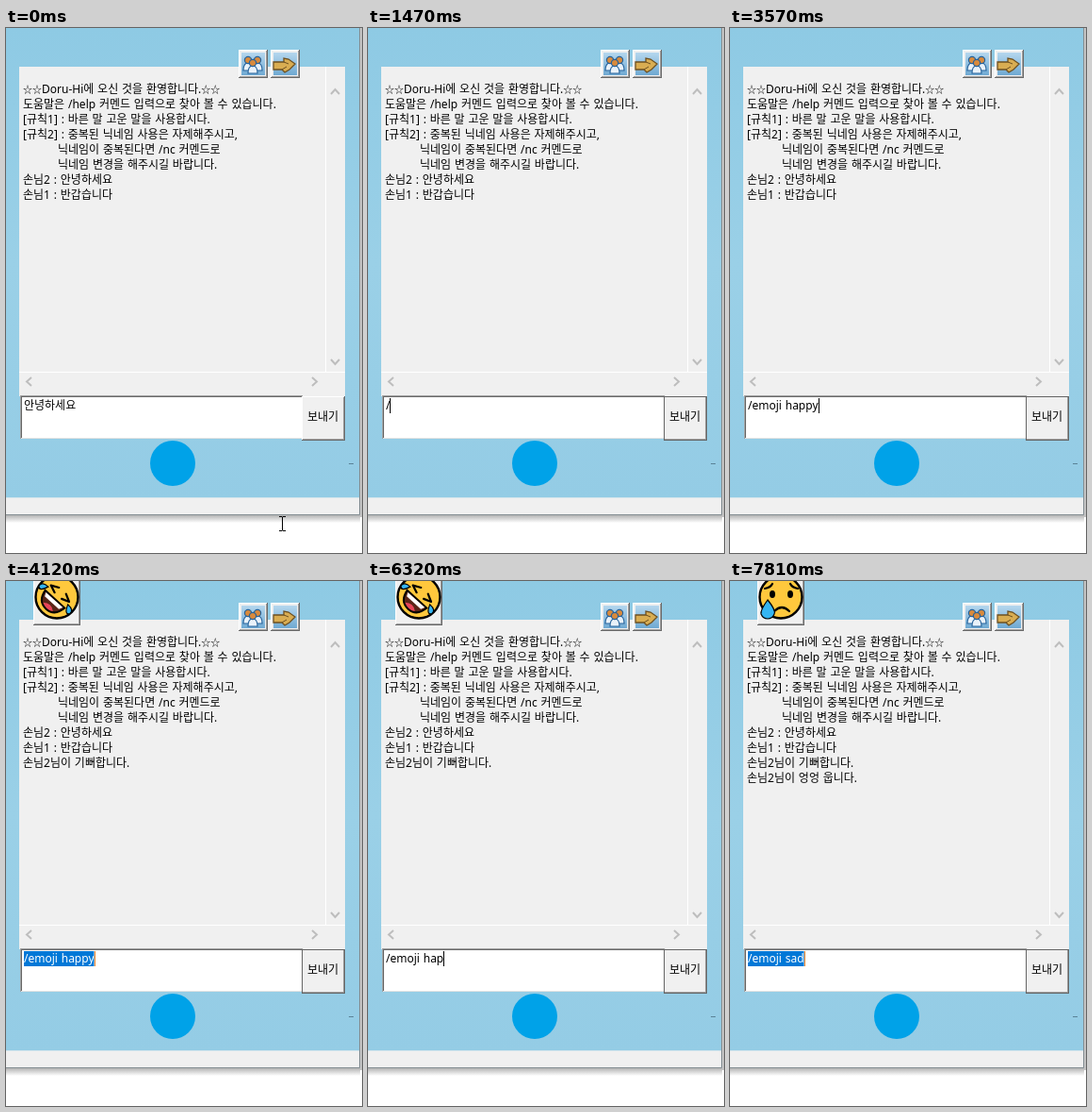
An HTML page that plays this animation: 378 by 556 pixels, repeating every 8000 ms.

```html
<!DOCTYPE html>
<html lang="ko">
<head>
<meta charset="utf-8">
<style>
html, body { margin: 0; width: 100%; height: 100%; overflow: hidden; background: #fff }
svg { display: block }
text {
  font: 12px "Noto Sans", "Noto Sans CJK KR", "Noto Sans CJK", sans-serif;
  word-spacing: .7px; white-space: pre;
}
.line { fill: none; stroke: #000; stroke-width: 2.2; stroke-linecap: round }
.arrow { fill: none; stroke: #bebebe; stroke-width: 2 }
.tear { fill: #35b5f2; stroke: #000; stroke-width: 1.2 }
.crisp { shape-rendering: crispEdges }
</style>
</head>
<body>
<svg width="378" height="556" viewBox="0 0 378 556">
  <defs>
    <linearGradient id="sky" x2="0" y2="1">
      <stop stop-color="#8ecae4"/><stop offset=".5" stop-color="#9ad0e7"/><stop offset="1" stop-color="#94cce5"/>
    </linearGradient>
    <linearGradient id="below" x2="0" y2="1">
      <stop stop-color="#aaa"/><stop offset="1" stop-color="#fff"/>
    </linearGradient>
    <linearGradient id="tile" x2="0" y2="1">
      <stop stop-color="#b5d7ee"/><stop offset="1" stop-color="#6fa9d2"/>
    </linearGradient>
    <g id="key" class="crisp">
      <path d="M0 0h31v30h-31z" fill="#696969"/>
      <path d="M0 0h30v29h-30z" fill="#fff"/>
      <path d="M1 1h29v28h-29z" fill="#a0a0a0"/>
      <path d="M1 1h28v27h-28z" fill="#f0f0f0"/>
      <path d="M3 3h25v24h-25z" fill="url(#tile)"/>
    </g>
    <g id="person" stroke="#27639b" stroke-width="1.2">
      <path d="M-5 11q0-8 5-8t5 8z" fill="#e9f2fa"/>
      <circle r="3.6" fill="#d98a3c"/>
    </g>
  </defs>

  <path d="M0 515h376v9h-376z" fill="url(#below)"/>
  <path d="M376 0h2v518h-2z" fill="#c4c4c4"/>
  <path d="M0 0h375v498h-375z" fill="url(#sky)"/>
  <path d="M0 498h375v17h-375z" fill="#f0f0f0"/>
  <path d="M0 497.5h375" stroke="#d5e5ec"/>
  <path d="M0 515.5h375.5V0" fill="none" stroke="#858f94"/>
  <path d="M364 461.5h5" stroke="#5b8296"/>
  <circle cx="177" cy="461" r="24" fill="#00a2e8"/>

  <g class="crisp">
    <path d="M14 41h346v349h-346z" fill="#f0f0f0"/>
    <path d="M339.5 41v323M14 364.5h346" stroke="#fff"/>
  </g>
  <path class="arrow" d="M345 70l4.500-5 4.500 5M345 351l4.500 5 4.500-5M27 370l-5 4.500 5 4.500M325 370l5 4.500-5 4.500"/>

  <use href="#key" x="247" y="23"/>
  <use href="#person" x="257" y="34"/>
  <use href="#person" x="267" y="34"/>
  <use href="#person" x="262" y="37"/>
  <use href="#key" x="281" y="23"/>
  <path d="M284 36h11v-4l5 1 7 5-6 6-5 3-3-3h-9z" fill="#d9ad52" stroke="#6d5021" stroke-width="1.3"/>
  <path d="M295 36l5 2M293 44l5-3" stroke="#6d5021"/>

  <g class="crisp">
    <path d="M15 389h300v46h-300z" fill="#fff"/>
    <path d="M15.500 435V389.500H315" fill="none" stroke="#a0a0a0"/>
    <path d="M16.500 434V390.500H314" fill="none" stroke="#696969"/>
    <path d="M16 434.500h299" stroke="#e3e3e3"/>
    <path d="M314 390h46v47h-46z" fill="#696969"/>
    <path d="M314 390h45v46h-45z" fill="#fff"/>
    <path d="M315 391h44v45h-44z" fill="#a0a0a0"/>
    <path d="M315 391h43v44h-43z" fill="#f0f0f0"/>
    <path id="focus" d="M314.500 390.500h45v46h-45z" fill="none" stroke="#646464"/>
  </g>
  <text x="336.500" y="416" text-anchor="middle">보내기</text>

  <g id="log"></g>

  <g id="face">
    <g class="crisp">
      <path d="M29 0h50v47h-50z" fill="#696969"/>
      <path d="M29 0h49v46h-49z" fill="#fff"/>
      <path d="M30 0h48v46h-48z" fill="#a0a0a0"/>
      <path d="M30 0h47v45h-47z" fill="#f0f0f0"/>
    </g>
    <circle cx="54" cy="17" r="22.500" fill="#ffc83d" stroke="#000" stroke-width="2.400"/>
    <g id="happy" transform="translate(54 17) rotate(42)">
      <path class="line" d="M-13-5l8-4M-13-5l8 3M13-5l-8-4M13-5l-8 3"/>
      <path d="M-14 3h28q-2 14-14 14t-14-14z" fill="#5a2518" stroke="#000" stroke-width="2"/>
      <path d="M-12 4h24l-2 4h-20z" fill="#fff"/>
      <path d="M-7 14q7-6 14 0-7 4-14 0z" fill="#e8455a"/>
      <path class="tear" d="M-14-2q-9 0-8 6 4 5 8-6zM14-2q9 0 8 6-4 5-8-6z"/>
    </g>
    <g id="sad">
      <ellipse cx="45" cy="14" rx="3" ry="4"/>
      <ellipse cx="64" cy="14" rx="3" ry="4"/>
      <path class="line" d="M37 8q6-1 8-5M72 8q-6-1-8-5M47 32q8-8 16 0"/>
      <path class="tear" d="M40 20q9 11 7 15-2 5-7 5t-7-5q-1-4 7-15z"/>
    </g>
  </g>

  <circle id="press" r="15" fill="#fff56c"/>
  <text id="entry" x="19" y="404"></text>
  <rect id="mark" y="392" height="16" fill="#0078d7"/>
  <text id="marked" y="404" fill="#fff"></text>
  <rect id="caret" class="crisp" y="392" width="1" height="16"/>
  <path id="beam" d="M-3.500-7.500h3l.5.5.5-.5h3M0-7V7M-3.500 7.500h3l.5-.5.5.5h3" fill="none" stroke="#000"/>
</svg>
<script>
const $ = id => document.getElementById(id);
const show = (id, on) => $(id).style.display = on ? '' : 'none';
const put = (id, attrs) => { for (const k in attrs) $(id).setAttribute(k, attrs[k]); };

const LOOP = 8000, LEFT = 19;
const HAPPY = 4050, SAD = 7740;

// [appears at, x, text]
const lines = [
  [0, 18, '<tspan font-size="10">☆☆</tspan>Doru-Hi에 오신 것을 환영합니다.<tspan font-size="10">☆☆</tspan>'],
  [0, 18, '도움말은 /help 커멘드 입력으로 찾아 볼 수 있습니다.'],
  [0, 18, '[규칙1] : 바른 말 고운 말을 사용합시다.'],
  [0, 18, '[규칙2] : 중복된 닉네임 사용은 자제해주시고,'],
  [0, 55, '닉네임이 중복된다면 /nc 커멘드로'],
  [0, 55, '닉네임 변경을 해주시길 바랍니다.'],
  [0, 18, '손님2 : 안녕하세요'],
  [0, 18, '손님1 : 반갑습니다'],
  [HAPPY, 18, '손님2님이 기뻐합니다.'],
  [SAD, 18, '손님2님이 엉엉 웁니다.'],
];
$('log').innerHTML = lines.map(([, x, s], i) => `<text x="${x}" y="${69 + 16 * i}">${s}</text>`).join('');
const rows = [...$('log').children];

// [time, entry, caret shown, all selected]
const edits = [
  [0, '안녕하세요', 0], [380, '안녕하세요', 1], [1170, '안녕하세요', 0],
  [1470, '/', 1], [1700, '', 0],
  [2020, '/', 1], [2170, '/e', 1], [2320, '/em', 1], [2430, '/emo', 1], [2550, '/emoj', 1],
  [2660, '/emoji', 1], [2810, '/emoji ', 1], [2960, '/emoji h', 1], [3040, '/emoji ha', 1],
  [3270, '/emoji hap', 1], [3420, '/emoji happ', 1], [3570, '/emoji happy', 1],
  [4120, '/emoji happy', 1, 1], [4600, '/emoji happy', 0, 1], [5150, '/emoji happy', 1, 1],
  [5700, '/emoji happy', 1], [6170, '/emoji happ', 1], [6320, '/emoji hap', 1],
  [6470, '/emoji ha', 1], [6550, '/emoji h', 1], [6620, '/emoji ', 1], [6700, '/emoji', 1],
  [6870, '/emoji ', 1], [7250, '/emoji s', 1], [7400, '/emoji sa', 1], [7480, '/emoji sad', 1],
  [7810, '/emoji sad', 1, 1],
];

// Pointer glides to the entry, then drags left out of the stage.
function pointer(t) {
  const k = t < 70 ? 0 : Math.min(9, Math.floor((t - 65) / 77));
  const p = Math.min(k / 5, 1), ease = p * p * (3 - 2 * p);
  const x = k > 5 ? 216 - 60 * (k - 5) : 293 - 77 * ease;
  return { x, y: 525 - 111 * ease, down: k >= 5 };
}

function drawEntry(t, x, down) {
  const [, text, caret, all] = edits.findLast(e => e[0] <= t);
  const dragging = down && t < 1470;
  const end = text.length;
  const from = dragging ? Math.max(0, Math.min(end, Math.round((x - LEFT) / 11))) : all ? 0 : end;
  $('entry').textContent = text;
  const edge = n => LEFT + (n ? $('entry').getSubStringLength(0, n) : 0);
  const start = edge(from), stop = edge(end);
  put('mark', { x: start, width: stop - start });
  put('marked', { x: start });
  $('marked').textContent = text.slice(from);
  put('caret', { x: Math.round(dragging ? start : stop), fill: from < end ? '#ff8728' : '#000' });
  show('caret', caret);
}

function draw(t) {
  const { x, y, down } = pointer(t);
  drawEntry(t, x, down);
  put('beam', { transform: `translate(${Math.round(x) + .5} ${Math.round(y)})` });
  put('press', { cx: x - 2, cy: y - 1 });
  show('beam', t < 770);
  show('press', down && t < 770);
  show('focus', t >= 380);
  rows.forEach((row, i) => row.style.display = t >= lines[i][0] ? '' : 'none');
  show('face', t >= HAPPY);
  show('happy', t < SAD);
  show('sad', t >= SAD);
}

const begin = performance.now();
function tick() {
  draw((performance.now() - begin) % LOOP);
  requestAnimationFrame(tick);
}
tick();
</script>
</body>
</html>
```
